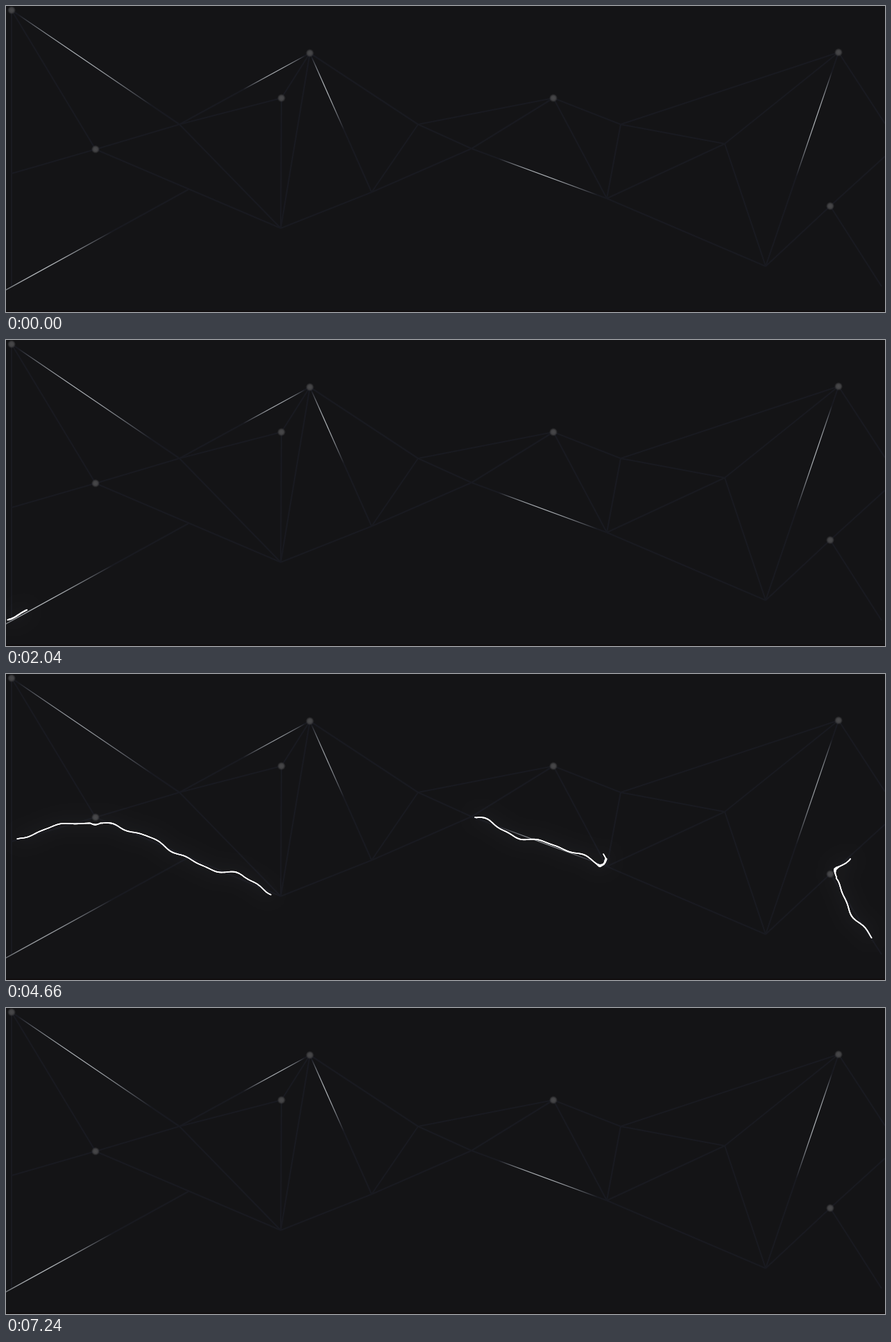
Write an HTML page with a canvas that moves like this. It is 1267x442 px and loops after 8000 ms.

```html
<!DOCTYPE html>
<html lang="en">
<head>
<meta charset="utf-8">
<title>Electric network</title>
<style>
html, body { margin: 0; width: 100%; height: 100%; overflow: hidden; background: #141416; }
canvas { display: block; }
</style>
</head>
<body>
<canvas id="stage" width="1267" height="442"></canvas>
<script>
const ctx = document.getElementById('stage').getContext('2d');
const LOOP = 8000, TICK = 20, STEP = 2, SPARK = 36;

const nodes = {
  A: [8, 6], B: [129, 207], C: [250, 171], D: [397, 133], E: [438, 68], F: [396, 321],
  G: [527, 269], H: [594, 171], I: [671, 206], J: [789, 133], K: [866, 278], L: [886, 171],
  M: [1200, 67], N: [1036, 199], O: [1095, 376], P: [1188, 289], Q: [1267, 170],
  R: [1267, 217], S: [1262, 405], T: [8, 242], U: [0, 410], V: [263, 265], X: [8, 406]
};
const edges = 'AX AB AC TB BC BF UV CE CD CF DE DF EF EG EH FG GH GI HI HJ IJ IK JK JL KL LM LN KN KO NM NO MO OP PR PS MQ';
// Lit stretch of an edge, as fractions of its length
const glints = [
  ['AC', .04, .83], ['EC', .04, .51], ['EG', .03, .55],
  ['IK', .2, .93], ['MO', .09, .58], ['UV', -.1, .58]
];

const clamp = (x, lo, hi) => Math.max(lo, Math.min(hi, x));
const route = letters => [...letters].map(c => nodes[c]);
const along = ([x, y], [u, v], k) => [x + (u - x) * k, y + (v - y) * k];

function line(a, b, style, width) {
  ctx.strokeStyle = style;
  ctx.lineWidth = width;
  ctx.beginPath();
  ctx.moveTo(...a);
  ctx.lineTo(...b);
  ctx.stroke();
}

// Walks a route in even steps.
function walk(points) {
  const path = [points[0]];
  for (let i = 1; i < points.length; i++) {
    const a = points[i - 1], b = points[i];
    const n = Math.round(Math.hypot(b[0] - a[0], b[1] - a[1]) / STEP);
    for (let k = 1; k <= n; k++) path.push(along(a, b, k / n));
  }
  return path;
}

const bolts = [];

// A bolt of the given length jumps out of the first node and leaves the last one at `end`.
function burst(start, end, length, routes) {
  for (const letters of routes.split(' ')) {
    const path = walk(route(letters));
    const spark = Math.min(SPARK, length);
    const speed = (path.length * STEP + length - spark) / (end - start);
    bolts.push({ start, end, length, spark, speed, path, seed: bolts.length * 2.3 });
  }
}

burst(20, 720, 320, 'UVFGI ACDEHJ IKNMQ SPOKL');
burst(660, 1260, 474, 'UVFEGI');
burst(736, 1260, 267, 'ACEHIJLM');
burst(970, 1060, 6, 'IJ');
burst(2040, 2700, 340, 'UVFEH');
burst(2060, 2700, 300, 'SPRPOM CEHIKL');
burst(4020, 4640, 320, 'ABCEG UVFD SPOMQ');
burst(4408, 5120, 394, 'TBFE');
burst(4552, 5120, 225, 'IKJLM');
burst(4498, 4820, 146, 'RPS');
burst(6580, 7240, 300, 'TBFEC IKNMQ');
burst(6620, 7240, 260, 'HIGFV JLKOPR');

function drawNetwork(dim) {
  ctx.fillStyle = '#141416';
  ctx.fillRect(0, 0, 1267, 442);
  ctx.fillStyle = '#110e0f';
  ctx.fillRect(0, 440, 1267, 2);
  for (const edge of edges.split(' ')) line(...route(edge), '#191a20', 2.2);
  for (const [edge, from, to] of glints) {
    const [a, b] = route(edge);
    const p = along(a, b, from), q = along(a, b, to);
    const fade = ctx.createLinearGradient(...p, ...q);
    for (let k = 0; k <= 1; k += .125) {
      fade.addColorStop(k, `rgba(215,220,220,${.85 * dim * Math.sin(Math.PI * k ** .85)})`);
    }
    line(p, q, fade, 1.1);
  }
  for (const [x, y] of route('ABDEJMP')) {
    const dot = ctx.createRadialGradient(x, y, 0, x, y, 6);
    dot.addColorStop(0, '#49494b');
    dot.addColorStop(.55, '#404042');
    dot.addColorStop(1, 'rgba(64,64,66,0)');
    ctx.fillStyle = dot;
    ctx.fillRect(x - 6, y - 6, 12, 12);
  }
}

// Visible part of a bolt, pushed off its route by slowly changing waves.
function pose({ path, start, speed, length, spark, seed }, t) {
  const head = spark + speed * (t - start), last = path.length - 1;
  const from = Math.max(0, Math.round((head - length) / STEP));
  const to = Math.min(last, Math.round(head / STEP));
  const points = [];
  for (let i = from; i <= to; i++) {
    const p = path[Math.max(0, i - 5)], q = path[Math.min(last, i + 5)];
    const len = Math.hypot(q[0] - p[0], q[1] - p[1]) || 1;
    const d = 4 * Math.sin(i / 12 + seed + t / 160)
      + 2.5 * Math.sin(i / 5.3 - seed - t / 200 + Math.sin(i / 17))
      + 2 * Math.sin(i / 3.4 + seed * 3) * Math.sin(i / 29 + seed);
    points.push([(p[0] + q[0]) / 2 - d * (q[1] - p[1]) / len, (p[1] + q[1]) / 2 + d * (q[0] - p[0]) / len]);
  }
  return points;
}

// Bolts swell where they bend; very short ones become a drop.
function drawBolt(points) {
  ctx.beginPath();
  for (const p of points) ctx.lineTo(...p);
  ctx.strokeStyle = '#fff';
  ctx.lineWidth = 1.5;
  ctx.shadowColor = 'rgba(170,180,205,.4)';
  ctx.shadowBlur = 24;
  ctx.stroke();
  ctx.shadowBlur = 0;
  const at = i => points[clamp(i, 0, points.length - 1)];
  const angle = (a, b) => Math.atan2(b[1] - a[1], b[0] - a[0]);
  for (let i = 1; i < points.length; i++) {
    const turn = Math.sin(angle(at(i), at(i + 4)) - angle(at(i - 4), at(i)));
    const bend = i > 4 && i < points.length - 4 ? 3 * turn * turn : 0;
    line(at(i - 1), at(i), '#fff', 1.5 + bend + 12 / points.length);
  }
}

function frame(now) {
  const t = Math.floor(now % LOOP / TICK) * TICK;
  const live = bolts.filter(b => t >= b.start && t < b.end)
    .map(b => pose(b, t)).filter(points => points.length > 1);
  const size = live.reduce((sum, points) => sum + points.length, 0);
  drawNetwork(1 - .15 * Math.min(1, size / 200));
  ctx.lineCap = ctx.lineJoin = 'round';
  live.forEach(drawBolt);
  ctx.lineCap = 'butt';
  requestAnimationFrame(frame);
}
requestAnimationFrame(frame);
</script>
</body>
</html>
```
